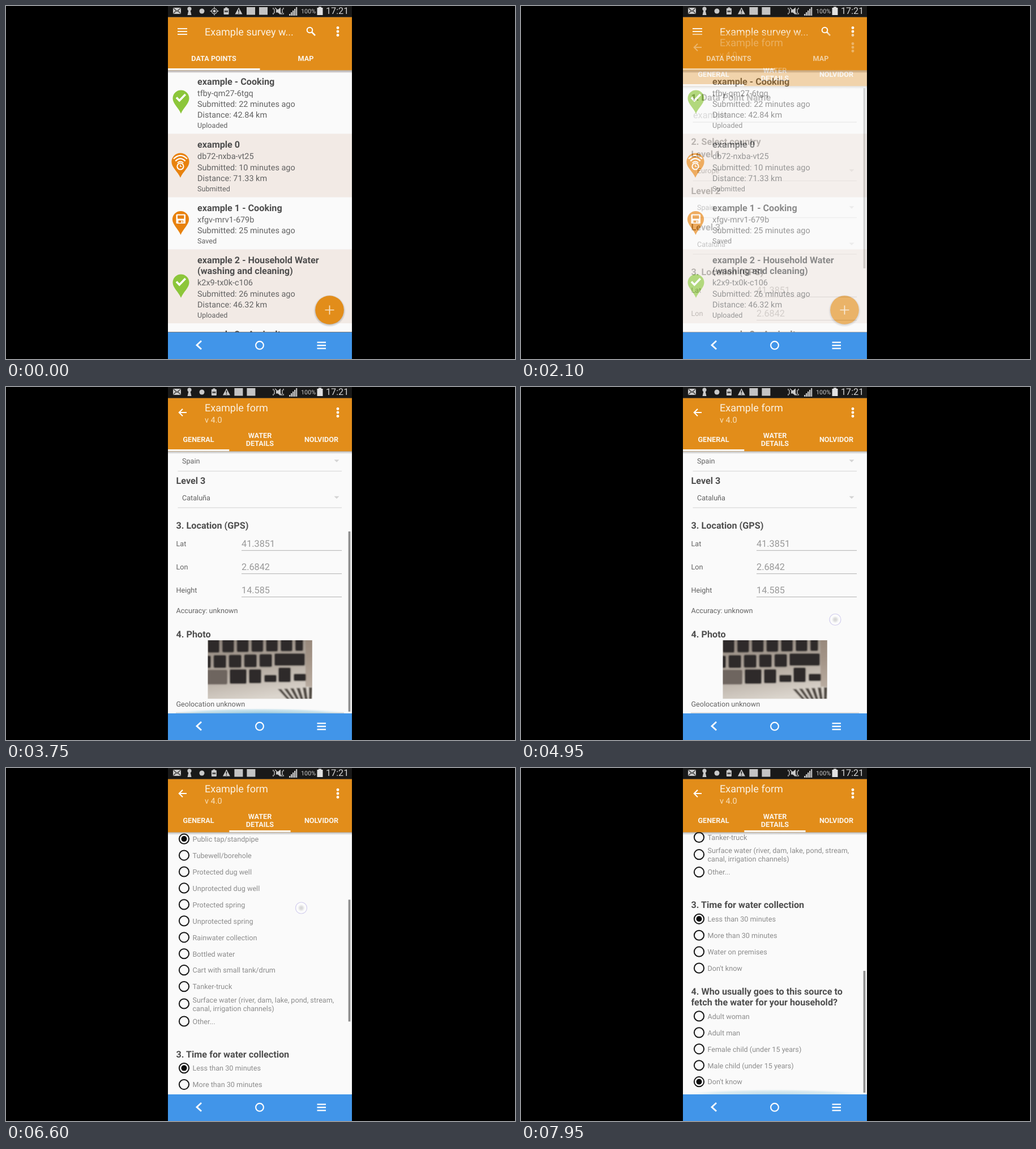
Recreate the animation shown at these times as an HTML page. Size 899x623 px, loop 8 s.

```html
<!DOCTYPE html>
<html lang="en">
<head>
<meta charset="utf-8">
<title>Survey app</title>
<style>
html, body { margin: 0; width: 100%; height: 100%; overflow: hidden; background: #000; }
svg { display: block; width: 899px; height: 623px; }
text { font-family: Roboto, "Noto Sans", sans-serif; text-rendering: geometricPrecision; white-space: pre; }
</style>
</head>
<body>
<svg id="stage" viewBox="0 0 899 623" xmlns="http://www.w3.org/2000/svg"></svg>
<script>
const LOOP = 8000, STEP = 150, W = 325, LEFT = 286, TOP = 19.5, EDGE = 113.4;
const ORANGE = '#e28d1a', PAPER = '#fafafa', GREEN = '#8cc63a', PIN = '#e8820e';

// markup helpers; text is placed by the middle of its capitals
const rect = (x, y, w, h, fill, extra = '') =>
  `<rect x="${x}" y="${y}" width="${w}" height="${h}" fill="${fill}" ${extra}/>`;
const circle = (x, y, r, extra) => `<circle cx="${x}" cy="${y}" r="${r}" ${extra}/>`;
const path = (d, extra) => `<path d="${d}" ${extra}/>`;
const line = (color, width) => `fill="none" stroke="${color}" stroke-width="${width}"`;
const group = (id, body, extra = '') => `<g id="${id}" ${extra}>${body}</g>`;
const label = (s, x, y, size, fill, extra = '') =>
  `<text x="${x}" y="${y + size * 0.355}" font-size="${size}" fill="${fill}" ${extra}>${s}</text>`;
const bold = (s, x, y) => label(s, x, y, 16.2, '#4e4e4e', 'font-weight="700"');
const small = (s, x, y, fill = '#626262') => label(s, x, y - .2, 12.64, fill);
const tab = (s, x, y) => label(s, x, y, 12.64, '#fbf5ec', 'font-weight="700" text-anchor="middle"');

function statusBar() {
  const c = '#c9c9c9';
  const battery = x => rect(x - 2, 2.5, 4, 2, c) + rect(x - 4.5, 4, 9, 11, c, 'rx="1"') + rect(x - 3, 8, 6, 3, '#555');
  const warning = x => path(`M${x} 2.5l6.5 12h-13z`, `fill="${c}"`) +
    path(`M${x} 6v4.5m0 1.3v1.5`, line('#222', 1.6));
  const square = x => rect(x - 7.5, 2, 15, 13.5, '#c4c4c4');
  const gps = circle(368, 9, 4.7, line(c, 1.3)) + path('M368 1.5v3m0 9v3M360.5 9h3m9 0h3', line(c, 1.3)) +
    circle(368, 9, 2.5, `id="fix" fill="${c}"`);
  const bars = [3, 6, 9, 12, 15].map((h, i) => rect(500 + i * 3, 17 - h, 2.3, h, i < 4 ? c : '#bbb')).join('');
  return rect(LEFT, 0, W, TOP, '#191919') +
    rect(295, 3, 14, 11, c) + path('M295.5 3.5l6.5 6 6.5-6M295.5 13.5l5-5m8 5l-5-5', line('#333', 1.1)) +
    circle(324, 5, 3.6, `fill="${c}"`) + path('M322.5 7h3l2 9h-7z', `fill="${c}"`) +
    circle(346, 9, 4.5, `fill="${c}"`) +
    group('gps', gps) +
    group('notes', battery(389) + warning(411) + square(432.5) + square(454.5)) +
    path('M477 6.5h3l5-4v13l-5-4h-3z', `fill="${c}"`) +
    path('M474 5v8m-2-10v3m0 6v3M488 5v8m2-10v3m0 6v3M475 3l13 12', line(c, 1.3)) +
    bars + label('100%', 521, 9, 10.8, c) +
    rect(552, 1.5, 5, 2, '#e2e2e2') + rect(549.5, 3, 10, 13, '#e2e2e2') +
    label('17:21', 565, 8.5, 16.2, '#d4d4d4');
}

function navBar() {
  return rect(LEFT, 576, W, 47, '#4195e9') +
    path('M345 591l-8 7.4 8 7.4', line('#fff', 2.8)) +
    circle(448, 598.8, 6.9, line('#fff', 2.1)) +
    path('M549.5 593.6h15.5m-15.5 5.4h15.5m-15.5 5.4h15.5', line('#fff', 2.4));
}

const dots = [38.5, 45, 51.5].map(y => circle(586, y, 2.4, 'fill="#fff"')).join('');
const header = rect(LEFT, TOP, W, EDGE - TOP, ORANGE);
const shadow = rect(LEFT, EDGE, W, 5, 'url(#shade)');
const mark = (w, extra = '') => rect(LEFT, 110, w, EDGE - 110, '#faf6f0', extra);

// map pins
const drop = (x, y, r, tip, fill) =>
  path(`M${x - r} ${y}a${r} ${r} 0 0 1 ${2 * r} 0c0 ${r * .65} ${-r * .72} ${tip * .62} ${-r} ${tip}c${-r * .28} ${-tip * .38} ${-r} ${r * .65 - tip} ${-r} ${-tip}z`, `fill="${fill}"`);
const checkPin = y => drop(309, y - 6, 14.5, 27, GREEN) +
  path(`M301 ${y - 7.5}l5.3 5.5 10.5-11`, line('#fff', 3.6));
const waitPin = drop(308, 275, 15.6, 28, PIN) +
  path('M296 269.8q12-12 24 0M299.3 273.6q8.7-8.4 17.4 0', line('#fff', 2.2)) +
  path('M302.8 276.8q5.2-4.6 10.4 0', line('#fff', 1.8)) +
  circle(308, 283, 5.6, `fill="${PIN}" stroke="#fff" stroke-width="2"`) +
  path('M308 280v3.4h2.6', line('#fff', 1.3));
const savePin = drop(308.5, 376.5, 14.6, 27.5, PIN) + rect(300.5, 367.5, 16.5, 16.5, '#fff', 'rx="1.5"') +
  rect(303, 369.5, 11.5, 6, PIN) + rect(304.5, 378.5, 8.5, 4, PIN) + rect(309.5, 379.2, 2.3, 3.3, '#fff');

function listScreen() {
  const row = (y, titles, lines, state) => {
    let out = titles.map((s, i) => bold(s, 338, y + i * 19)).join('');
    y += (titles.length - 1) * 19 + 20.5;
    out += lines.map((s, i) => label(s, 338, y + i * 19.4, 14.44, '#626262')).join('');
    return out + small(state, 338, y + lines.length * 19.4 - 1);
  };
  return rect(LEFT, TOP, W, 556, PAPER) +
    rect(LEFT, 114, W, 3.5, '#e9e4e4') +
    rect(LEFT, EDGE, W, 112.1, '#e7e6ea', 'id="press"') +
    rect(LEFT, 225.5, W, 112, '#f2eae5') + rect(LEFT, 429.5, W, 130.5, '#f2eae5') +
    row(133, ['example - Cooking'], ['tfby-qm27-6tgq', 'Submitted: 22 minutes ago', 'Distance: 42.84 km'], 'Uploaded') +
    row(244.7, ['example 0'], ['db72-nxba-vt25', 'Submitted: 10 minutes ago', 'Distance: 71.33 km'], 'Submitted') +
    row(356.4, ['example 1 - Cooking'], ['xfgv-mrv1-679b', 'Submitted: 25 minutes ago'], 'Saved') +
    row(448.7, ['example 2 - Household Water', '(washing and cleaning)'],
      ['k2x9-tx0k-c106', 'Submitted: 26 minutes ago', 'Distance: 46.32 km'], 'Uploaded') +
    bold('example 3 - Agriculture', 338, 579) +
    checkPin(169) + waitPin + savePin + checkPin(494) +
    circle(571.5, 538, 28.5, 'fill="url(#halo)"') + circle(571.5, 536.5, 25.3, `fill="${ORANGE}"`) +
    path('M563.5 536.5h16m-8-8v16', line('#f8e3c6', 1.7)) +
    header +
    path('M303 40h17m-17 5h17m-17 5h17', line('#fbf3e6', 2)) +
    label('Example survey w...', 351, 46, 18.06, '#fbf1e2') +
    circle(536.5, 42.5, 4.8, line('#fff', 2)) + path('M540 46l6 6', line('#fff', 2.5)) + dots +
    tab('DATA POINTS', 367, 92.7) + tab('MAP', 529.5, 92.7) + mark(162.5) + shadow;
}

function photo() {
  const key = (x, y, w, h, fill = '#2d2a29') => rect(x, y, w, h, fill, 'rx="3"');
  let out = rect(350, 640, 198, 114, 'url(#desk)');
  for (let i = 0; i < 7; i++) out += key(356 + i * 25.8, 640, i < 6 ? 21 : 14, 26 - i * .5);
  out += key(350, 671, 12, 22);
  for (let i = 0; i < 4; i++) out += key(366.5 + i * 27, 670 - i * .6, 22.5, 23);
  out += key(474, 667, 54, 22) + key(350, 696, 41, 26, '#6e655e') + key(395, 695, 30, 26) +
    key(429, 695, 22, 25) + key(456, 705, 22, 13) + key(481, 692, 22, 26) + key(508, 703, 22, 13);
  // fanned grille in the corner
  for (let i = 0; i < 6; i++)
    out += path(`M${480 + i * 11} ${730 - i * .6}h6l${19 - i * 4} 22h-5z`, 'fill="#4f4842"');
  out += rect(529, 640, 19, 86, '#8a7462', 'opacity=".4"');
  return `<g clip-path="url(#frame)"><g filter="url(#soft)">${out}</g></g>`;
}

function generalPage() {
  const rule = (x, y, w, c) => rect(x, y - .6, w, 1.2, c);
  const pick = (n, s, y) => bold('Level ' + n, 300.5, y) + small(s, 311, y + 30) +
    path(`M579.5 ${y + 27.2}h9l-4.5 4.5z`, 'fill="#d4d4d4"') + rule(303.5, y + 47.5, 289.5, '#dadada');
  const field = (name, s, y) => small(name, 300.5, y) + label(s, 416, y - 1, 16.25, '#999') +
    rule(416, y + 11.5, 177, '#bcbcbc');
  return bold('1. Data Point Name', 300.5, 133) + label('example', 304, 164, 16.25, '#a0a0a0') +
    rule(303.5, 177, 289.5, '#cbcbcb') +
    bold('2. Select country', 300.5, 211) +
    pick(1, 'Europe', 233) + pick(2, 'Spain', 298) + pick(3, 'Cataluña', 362.5) +
    bold('3. Location (GPS)', 300.5, 441.5) +
    field('Lat', '41.3851', 474) + field('Lon', '2.6842', 515) + field('Height', '14.585', 556) +
    small('Accuracy: unknown', 300.5, 591.8) + bold('4. Photo', 300.5, 633.5) + photo() +
    small('Geolocation unknown', 300.5, 756.8) + rule(300, 772, 297, '#cfcfcf');
}

function waterPage() {
  const radio = (y, on) => circle(314.5, y, 8.6, line('#161616', 2)) + (on ? circle(314.5, y, 5, 'fill="#0c0c0c"') : '');
  const options = (y, names, chosen) => names.map((s, i) =>
    radio(y + i * 28.95, i === chosen) + small(s, 329.5, y + i * 28.95 + .5, '#8c8c8c')).join('');
  return bold('1. Type of Water Use', 300.5, 133) +
    options(157.7, ['Drinking Water', 'Household Water (washing and cleaning)', 'Cooking', 'Agriculture'], 2) +
    bold('2. Source of drinking water', 300.5, 285.5) +
    options(310.2, ['Piped water into dwelling', 'Piped water to yard/plot', 'Public tap/standpipe',
      'Tubewell/borehole', 'Protected dug well', 'Unprotected dug well', 'Protected spring',
      'Unprotected spring', 'Rainwater collection', 'Bottled water', 'Cart with small tank/drum', 'Tanker-truck'], 2) +
    radio(659) + small('Surface water (river, dam, lake, pond, stream,', 329.5, 652.5, '#8c8c8c') +
    small('canal, irrigation channels)', 329.5, 667.5, '#8c8c8c') +
    options(690, ['Other...'], -1) +
    bold('3. Time for water collection', 300.5, 748) +
    options(772.6, ['Less than 30 minutes', 'More than 30 minutes', 'Water on premises', "Don't know"], 0) +
    bold('4. Who usually goes to this source to', 300.5, 900.5) +
    bold('fetch the water for your household?', 300.5, 919.5) +
    options(944.2, ['Adult woman', 'Adult man', 'Female child (under 15 years)',
      'Male child (under 15 years)', "Don't know"], 4);
}

function formScreen() {
  const body = rect(LEFT, EDGE, W, 463, PAPER) + group('general', generalPage()) + group('water', waterPage()) +
    '<ellipse id="glow" cx="448.5" cy="576" rx="160" ry="9" fill="url(#blue)"/>' +
    rect(604.6, 117, 3.8, 318, '#8f8f8f', 'id="thumb"');
  return group('body', body, 'clip-path="url(#view)"') +
    header +
    path('M319 45h-13m6-6.3l-6.3 6.3 6.3 6.3', line('#fff', 2)) +
    label('Example form', 351, 36.5, 18.06, '#fbf1e2') + label('v 4.0', 351, 58.2, 14.4, '#f8dfba') + dots +
    tab('GENERAL', 340, 92.7) + tab('WATER', 448.5, 85.3) + tab('DETAILS', 448.5, 99.7) + tab('NOLVIDOR', 557, 92.7) +
    mark(108.3, 'id="mark"') + shadow;
}

const stop = (o, c, a = 1) => `<stop offset="${o}" stop-color="${c}" stop-opacity="${a}"/>`;
const defs = `<defs>
  <linearGradient id="shade" x2="0" y2="1">${stop(0, '#000', .26)}${stop(1, '#000', 0)}</linearGradient>
  <linearGradient id="desk" x2=".3" y2="1">${stop(0, '#8d8279')}${stop(.55, '#b3a99f')}${stop(1, '#dbd5cd')}</linearGradient>
  <radialGradient id="halo">${stop(.82, '#000', .25)}${stop(1, '#000', 0)}</radialGradient>
  <radialGradient id="blue">${stop(0, '#7fbcd8', .8)}${stop(.7, '#9accdf', .5)}${stop(1, '#c4e2ec', 0)}</radialGradient>
  <radialGradient id="tip">${stop(0, '#d2d2d2')}${stop(.5, '#dadada', .8)}${stop(1, '#e8e8e8', 0)}</radialGradient>
  <filter id="soft"><feGaussianBlur stdDeviation="1"/></filter>
  <clipPath id="frame"><rect x="356.5" y="644" width="184.3" height="103.3"/></clipPath>
  <clipPath id="view"><rect x="286" y="113" width="325" height="463"/></clipPath>
  <clipPath id="screen"><rect x="286" y="19" width="325" height="557"/></clipPath>
</defs>`;

const touch = circle(0, 0, 10, 'id="ring" fill="#fff" fill-opacity=".4" stroke-width="1.2"') +
  circle(0, 0, 6.5, 'fill="url(#tip)"');

document.getElementById('stage').innerHTML = defs + rect(0, 0, 899, 623, '#000') +
  group('list', listScreen(), 'clip-path="url(#screen)"') +
  `<g clip-path="url(#screen)">${group('form', formScreen())}</g>` +
  group('touch', touch) + statusBar() + navBar();

const el = {};
document.querySelectorAll('#stage [id]').forEach(n => el[n.id] = n);
const set = (id, attrs) => { for (const k in attrs) el[id].setAttribute(k, attrs[k]); };
const show = (id, on) => set(id, { opacity: +on });
const move = (id, x, y) => set(id, { transform: `translate(${x} ${y})` });

// linear interpolation through [time, value] points
function track(t, pts) {
  if (t <= pts[0][0]) return pts[0][1];
  for (let i = 1; i < pts.length; i++) {
    const [a, u] = pts[i - 1], [b, v] = pts[i];
    if (t <= b) return u + (v - u) * (t - a) / (b - a);
  }
  return pts[pts.length - 1][1];
}

const SCROLL1 = [[3150, 0], [3300, 25], [3450, 95], [3600, 160], [3750, 197]];
const SCROLL2 = [[6000, 0], [6150, 20], [6300, 88], [6450, 168], [6600, 243], [6750, 322],
  [6900, 384], [7050, 434], [7200, 472], [7350, 497], [7500, 506.3]];
const SWIPE = [[4950, 0], [5100, .16], [5250, .58], [5400, .91], [5550, .988], [5700, 1]];
const GLOW = [[3600, 0], [3750, 1], [4050, .8], [4800, 0], [7350, 0], [7500, 1], [7950, .65]];

function fingerAt(t, s1, s2, p) {
  if (t >= 1050 && t < 1350) return [508, 161];
  if (t >= 3150 && t < 3750) return [545, 480 - s1];
  if (t >= 4950 && t < 5400) return [555 - W * p, 410.5];
  if (t >= 6000 && t < 6750) return [521.5, 490 - s2];
  return null;
}

function draw(time) {
  const t = Math.floor(time / STEP) * STEP;
  const s1 = track(t, SCROLL1), s2 = track(t, SCROLL2), p = track(t, SWIPE);

  const located = t < 1500;
  show('gps', located);
  show('fix', t < 150 || (t >= 600 && t < 1050));
  move('notes', located ? 0 : -21.6, 0);
  set('press', { opacity: track(t, [[900, 0], [1050, .4], [1200, 1], [1350, .6], [1500, 0]]) });

  set('form', { opacity: t < 2100 ? 0 : track(t, [[2100, .35], [2250, .9], [2400, 1]]) });
  move('form', 0, track(t, [[2100, 28], [2250, 5], [2400, 0]]));
  move('general', -W * p, -s1);
  move('water', W * (1 - p), -s2);
  set('mark', { x: LEFT + 108.3 * p });
  set('glow', { opacity: track(t, GLOW) });

  const second = t >= 6000;
  set('thumb', {
    y: second ? 116.5 + s2 * .477 : 117 + s1 * .7,
    height: second ? 215 : 318,
    opacity: second ? track(t, [[6000, 0], [6150, 1]]) : track(t, [[4200, 1], [4500, 0]])
  });

  const finger = fingerAt(t, s1, s2, p);
  show('touch', !!finger);
  if (finger) move('touch', ...finger);
  set('ring', { stroke: t < 2000 ? '#f6f6f8' : '#d3cfee' });
}

const start = performance.now();
function tick() {
  draw((performance.now() - start) % LOOP);
  requestAnimationFrame(tick);
}
tick();
</script>
</body>
</html>
```
